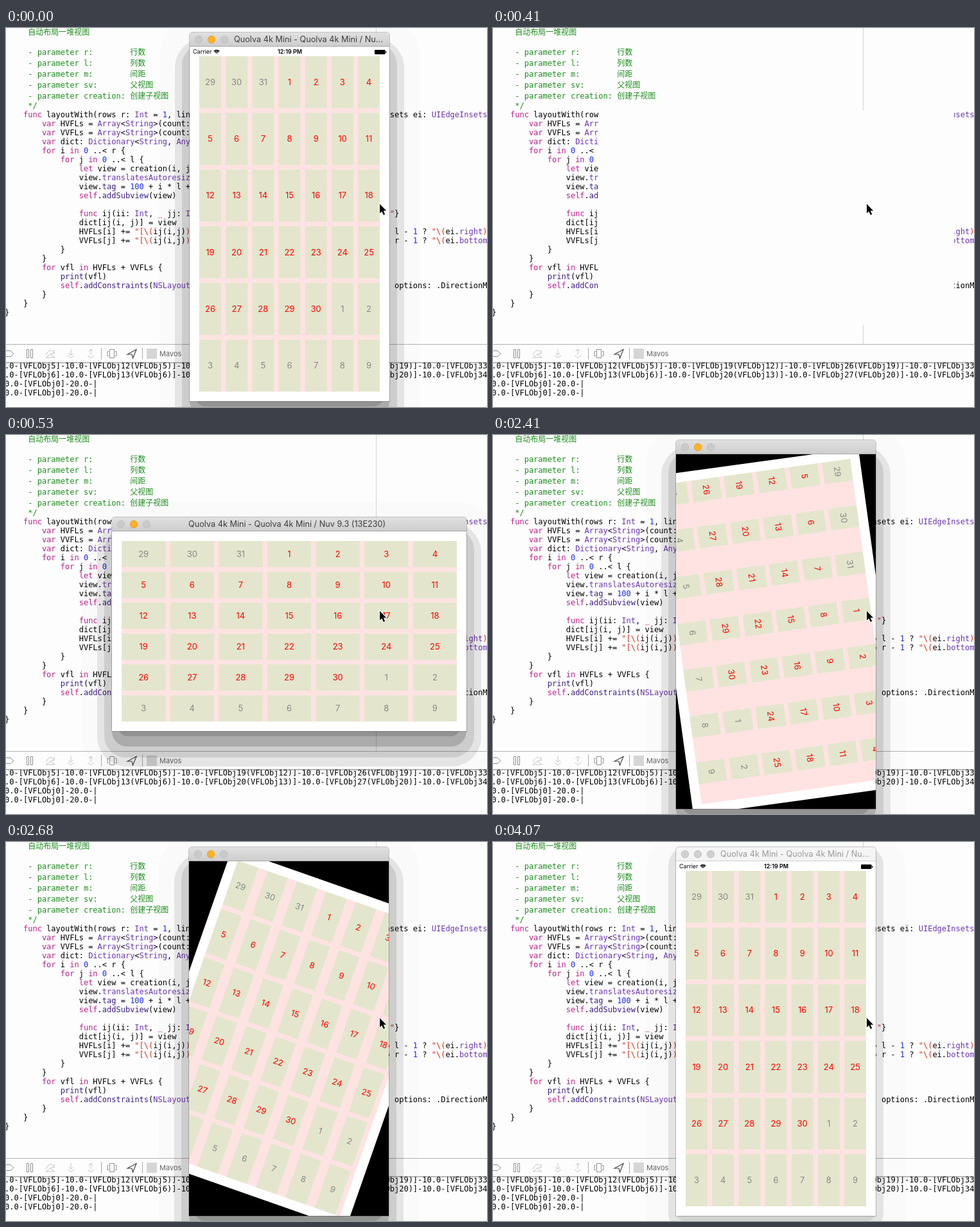
Animation of 749 by 590 pixels, one loop 4.12 s. Source, as an HTML page with a canvas:

```html
<!DOCTYPE html>
<html lang="en">
<head>
<meta charset="utf-8">
<title>Grid layout rotation</title>
<style>
  html, body { margin: 0; width: 749px; height: 590px; overflow: hidden; background: #fdfdfd; }
  canvas { display: block; width: 749px; height: 590px; }
</style>
</head>
<body>
<canvas id="stage" width="749" height="590"></canvas>
<script>
const ctx = document.getElementById('stage').getContext('2d');
const LOOP = 4120;
const MONO = '12px "DejaVu Sans Mono", "Noto Sans CJK SC", "Noto Sans CJK", monospace';
const SANS = 'Inter, "Liberation Sans", sans-serif';
const CHAR = 7.224, LEFT = -1.9;
const PAPER = '#fdfdfd';
const MODEL = 'Quolva 4k Mini';
const FULL_TITLE = `${MODEL} - ${MODEL} / Nuv 9.3 (13E230)`;
const CUT_TITLE = `${MODEL} - ${MODEL} / Nu...`;

const COLORS = { key: '#bb1f88', type: '#6a35ad', call: '#3d1d81', num: '#1c2bee', str: '#d12f1b' };
const WORDS = {
  key: 'func var for in let self return false _',
  type: 'Int CGFloat UIEdgeInsets Array String Dictionary AnyObject NSLayoutConstraint ' +
        'translatesAutoresizingMaskIntoConstraints left top right bottom',
  call: 'print addSubview addConstraints constraintsWithVisualFormat tag'
};
const wordColor = {};
for (const kind in WORDS) for (const w of WORDS[kind].split(' ')) wordColor[w] = COLORS[kind];

const CODE = String.raw`
    func layoutWith(rows r: Int = 1, lines l: Int = 1, margin m:CGFloat = 5, edgeInsets ei: UIEdgeInsets
        var HVFLs = Array<String>(count: r, repeatedValue: "H:|-\(ei.left)-")
        var VVFLs = Array<String>(count: l, repeatedValue: "V:|-\(ei.top)-")
        var dict: Dictionary<String, AnyObject> = [:]
        for i in 0 ..< r {
            for j in 0 ..< l {
                let view = creation(i, j)
                view.translatesAutoresizingMaskIntoConstraints = false
                view.tag = 100 + i * l + j
                self.addSubview(view)

                func ij(ii: Int, _ jj: Int) -> String {return "VFLObj\(ii * l + jj)"}
                dict[ij(i, j)] = view
                HVFLs[i] += "[\(ij(i,j))\(j > 0 ? "(\(ij(i, j - 1)))" : "")]-\(j == l - 1 ? "\(ei.right)-
                VVFLs[j] += "[\(ij(i,j))\(i > 0 ? "(\(ij(i - 1, j)))" : "")]-\(i == r - 1 ? "\(ei.bottom)
            }
        }
        for vfl in HVFLs + VVFLs {
            print(vfl)
            self.addConstraints(NSLayoutConstraint.constraintsWithVisualFormat(vfl, options: .DirectionMask
        }
    }
}`.split('\n').slice(1);

const PARAMS = [['r', '行数'], ['l', '列数'], ['m', '间距'], ['sv', '父视图'], ['creation', '创建子视图']];

const chain = ids => ids.map((id, k) => `[VFLObj${id}${k ? `(VFLObj${ids[k - 1]})` : ''}]`).join('-10.0-');
const CONSOLE = ['.0-' + chain([5, 12, 19, 26, 33]), '.0-' + chain([6, 13, 20, 27, 34]),
  '0.0-[VFLObj0]-20.0-|', '0.0-[VFLObj0]-20.0-|'];

const lerp = (a, b, p) => a + (b - a) * p;

function text(s, x, y, color, font, align = 'left', base = 'alphabetic') {
  ctx.font = font;
  ctx.fillStyle = color;
  ctx.textAlign = align;
  ctx.textBaseline = base;
  ctx.fillText(s, x, y);
}

function rect(x, y, w, h, color) {
  ctx.fillStyle = color;
  ctx.fillRect(x, y, w, h);
}

function stroke(path, color, width = 1) {
  ctx.strokeStyle = color;
  ctx.lineWidth = width;
  ctx.stroke(new Path2D(path));
}

const mono = (s, col, y, color) => text(s, LEFT + col * CHAR, y, color, MONO);

// Colours one line; the stack follows strings and their interpolations.
function codeLine(line, y) {
  const stack = [0];
  for (const m of line.matchAll(/\\\(|[A-Za-z_]\w*|\d+|\S/g)) {
    const tok = m[0], top = stack.length - 1;
    let color = wordColor[tok] || (/^\d/.test(tok) ? COLORS.num : '#000');
    if (stack[top] === 'str') {
      color = COLORS.str;
      if (tok === '"') stack.pop();
      else if (tok === '\\(') stack.push(0);
    } else if (tok === '"') {
      color = COLORS.str;
      stack.push('str');
    } else if (tok === '(') {
      stack[top]++;
    } else if (tok === ')') {
      if (top && stack[top] === 0) {
        color = COLORS.str;
        stack.pop();
      } else stack[top]--;
    }
    mono(tok, m.index, y, color);
  }
}

function toolbar() {
  rect(0, 492, 749, 1, '#b2b2b2');
  const pale = '#c4c4c4', mid = '#8e8e8e';
  stroke('M-3 502.5H7L12 507L7 511.5H-3', mid);
  stroke('M32.5 500.5h3v13h-3zM38.5 500.5h3v13h-3z', mid);
  stroke('M62 509Q69 496 75 506M75 501V507H69M62 513L69 508L76 513Z', pale);
  stroke('M101 500V509M97.5 506L101 509.5L104.5 506M96 510L101 513.5L106 510', pale);
  stroke('M132 509V500M128.5 503.5L132 500L135.5 503.5M127 510L132 513.5L137 510', pale);
  stroke('M161.5 500.5h7v13h-7zM160 503.5h-2v7h2M170 503.5h2v7h-2', mid);
  stroke('M189 508L203 500.5L197.5 514L196 508Z', '#444', 1.2);
  for (const x of [148, 212]) rect(x, 498, 1, 18, '#a8a8a8');
  rect(219, 499, 16, 16, '#d6d6d6');
  text('Mavos', 239, 507.5, '#666', '11px ' + SANS, 'left', 'middle');
}

function editor() {
  rect(0, 0, 749, 590, PAPER);
  rect(576, 0, 1, 492, '#d4d4d4');
  const green = '#1c8c1c';
  mono('自动布局一堆视图', 5, 11, green);
  PARAMS.forEach(([name, note], k) => {
    mono(`- parameter ${name}:`, 5, 42 + 17 * k, green);
    mono(note, 27, 42 + 17 * k, green);
  });
  mono('*/', 5, 125, green);
  CODE.forEach((line, k) => codeLine(line, 139 + 14 * k));
  toolbar();
  rect(0, 520.5, 749, 1, '#777');
  ctx.save();
  ctx.beginPath();
  ctx.rect(0, 521, 749, 69);
  ctx.clip();
  CONSOLE.forEach((line, k) => mono(line, 0, 530 + 14 * k, '#000'));
  ctx.restore();
}

// Bands: outset, drop, corner radius, opacity.
const STRONG = [[47, 23, 60, 0.012], [23, 32, 46, 0.09], [12, 29, 34, 0.1], [0, 24, 24, 0.17], [-10, 18, 14, 0.14]];
const SOFT = [[47, 23, 60, 0.01], [12, 12, 28, 0.09], [0, 8, 14, 0.08]];

function shadow(x, y, w, h, bands) {
  for (const [out, drop, r, alpha] of bands) {
    ctx.fillStyle = `rgba(0,0,0,${alpha})`;
    ctx.beginPath();
    ctx.roundRect(x - out, y - out + drop, w + 2 * out, h + 2 * out, r);
    ctx.fill();
  }
}

function frame(x, y, w, h, active, title, titleX) {
  shadow(x, y, w, h, active ? STRONG : SOFT);
  const fade = ctx.createLinearGradient(0, y, 0, y + 22);
  fade.addColorStop(0, active ? '#e0e0e0' : '#f6f6f6');
  fade.addColorStop(1, active ? '#cdcdcd' : '#f4f4f4');
  ctx.fillStyle = fade;
  ctx.beginPath();
  ctx.roundRect(x, y, w, 22, [5, 5, 0, 0]);
  ctx.fill();
  rect(x, y + 21, w, 1, active ? '#a6a6a6' : '#d2d2d2');
  for (let k = 0; k < 3; k++) {
    ctx.beginPath();
    ctx.arc(x + 14 + 20 * k, y + 11, 5.7, 0, 7);
    ctx.fillStyle = active ? (k === 1 ? '#fdb128' : '#cacaca') : '#d0d0d0';
    ctx.fill();
    ctx.strokeStyle = active && k === 1 ? '#e09c1e' : '#bcbcbc';
    ctx.lineWidth = 0.8;
    ctx.stroke();
  }
  if (title) text(title, x + titleX, y + 11.5, active ? '#3c3c3c' : '#999', '12.7px ' + SANS, 'left', 'middle');
  rect(x, y + 22, w, h - 22, '#fff');
  ctx.strokeStyle = 'rgba(0,0,0,.22)';
  ctx.lineWidth = 1;
  ctx.beginPath();
  ctx.roundRect(x - 0.5, y - 0.5, w + 1, h + 1, [5, 5, 0, 0]);
  ctx.stroke();
}

// Calendar centred on the current origin; cellW may differ from the column pitch.
function calendar(w, h, cellW) {
  const pad = 15, gap = 7.3;
  const pitchX = (w - 2 * pad + gap) / 7, pitchY = (h - 2 * pad + gap) / 6;
  rect(-w / 2, -h / 2, w, h, '#fff');
  rect(pad - w / 2, pad - h / 2, w - 2 * pad, h - 2 * pad, '#ffe3e3');
  const cw = cellW || pitchX - gap, ch = pitchY - gap;
  for (let k = 0; k < 42; k++) {
    const x = pad - w / 2 + (k % 7) * pitchX;
    const y = pad - h / 2 + Math.floor(k / 7) * pitchY;
    const inMonth = k > 2 && k < 33;
    const day = k < 3 ? 29 + k : inMonth ? k - 2 : k - 32;
    rect(x, y, cw, ch, '#e3e6cc');
    text(day, x + cw / 2, y + ch / 2 + 0.7, inMonth ? '#ff0000' : '#878787', '13px ' + SANS, 'center', 'middle');
  }
}

function statusBar(x, y) {
  const cy = y + 8.5;
  text('Carrier', x + 5, cy, '#000', '9px ' + SANS, 'left', 'middle');
  for (const r of [2, 4, 6]) {
    ctx.beginPath();
    ctx.arc(x + 42, cy + 3, r, -Math.PI * 0.75, -Math.PI * 0.25);
    ctx.strokeStyle = '#000';
    ctx.lineWidth = 1.3;
    ctx.stroke();
  }
  text('12:19 PM', x + 156, cy, '#000', '600 9px ' + SANS, 'center', 'middle');
  ctx.fillStyle = '#000';
  ctx.beginPath();
  ctx.roundRect(x + 288, cy - 3.5, 16.5, 7, 1.2);
  ctx.fill();
  rect(x + 305, cy - 1.2, 1.3, 2.6, '#000');
}

// p runs from landscape (0) to portrait (1).
function portrait(x, y, active, title, p, barAlpha) {
  frame(x, y, 311, 574, active, title, 69);
  ctx.save();
  ctx.beginPath();
  ctx.rect(x, y + 22, 311, 552);
  ctx.clip();
  if (p < 1) rect(x, y + 22, 311, 552, '#000');
  ctx.translate(x + 155.5, y + 298);
  ctx.rotate((1 - p) * Math.PI / 2);
  calendar(lerp(552, 311, p), lerp(311, 552, p), 33.9);
  ctx.restore();
  ctx.globalAlpha = barAlpha;
  statusBar(x, y + 22);
  ctx.globalAlpha = 1;
}

function landscape() {
  frame(165, 128, 552, 333, true, FULL_TITLE, 119);
  ctx.save();
  ctx.translate(441, 305.5);
  calendar(552, 311);
  ctx.restore();
}

function turning(t) {
  const step = 510 / 7;
  const now = t < 2560 ? 2410 : 2560 + Math.min(7, Math.floor((t - 2560) / step)) * step;
  const u = Math.min(1, (now - 2310) / 480);
  const p = u < 0.5 ? 2 * u * u : 1 - 2 * (1 - u) ** 2;
  const bar = Math.min(1, Math.max(0, (now - 2700) / 150));
  portrait(285, 8, true, now > 2840 ? CUT_TITLE : '', p, bar);
}

function cursor() {
  const arrow = new Path2D('M582 274V288.5L585.3 285.4L587.8 291L590.2 290L587.7 284.5H592.2Z');
  ctx.lineJoin = 'round';
  ctx.lineWidth = 2;
  ctx.strokeStyle = '#fff';
  ctx.stroke(arrow);
  ctx.fillStyle = '#000';
  ctx.fill(arrow);
  ctx.lineJoin = 'miter';
}

const SCENES = [
  [270, () => portrait(286, 7, true, CUT_TITLE, 1, 1)],
  [410, () => {}],
  [530, () => rect(164, 128, 554, 334, PAPER)],
  [2320, landscape],
  [2410, () => rect(285, 8, 311, 582, PAPER)],
  [4070, turning],
  [LOOP, () => portrait(285, 8, false, CUT_TITLE, 1, 1)]
];

const start = performance.now();

function draw() {
  const t = (performance.now() - start) % LOOP;
  editor();
  SCENES.find(([end]) => t < end)[1](t);
  cursor();
  requestAnimationFrame(draw);
}
draw();
</script>
</body>
</html>
```
